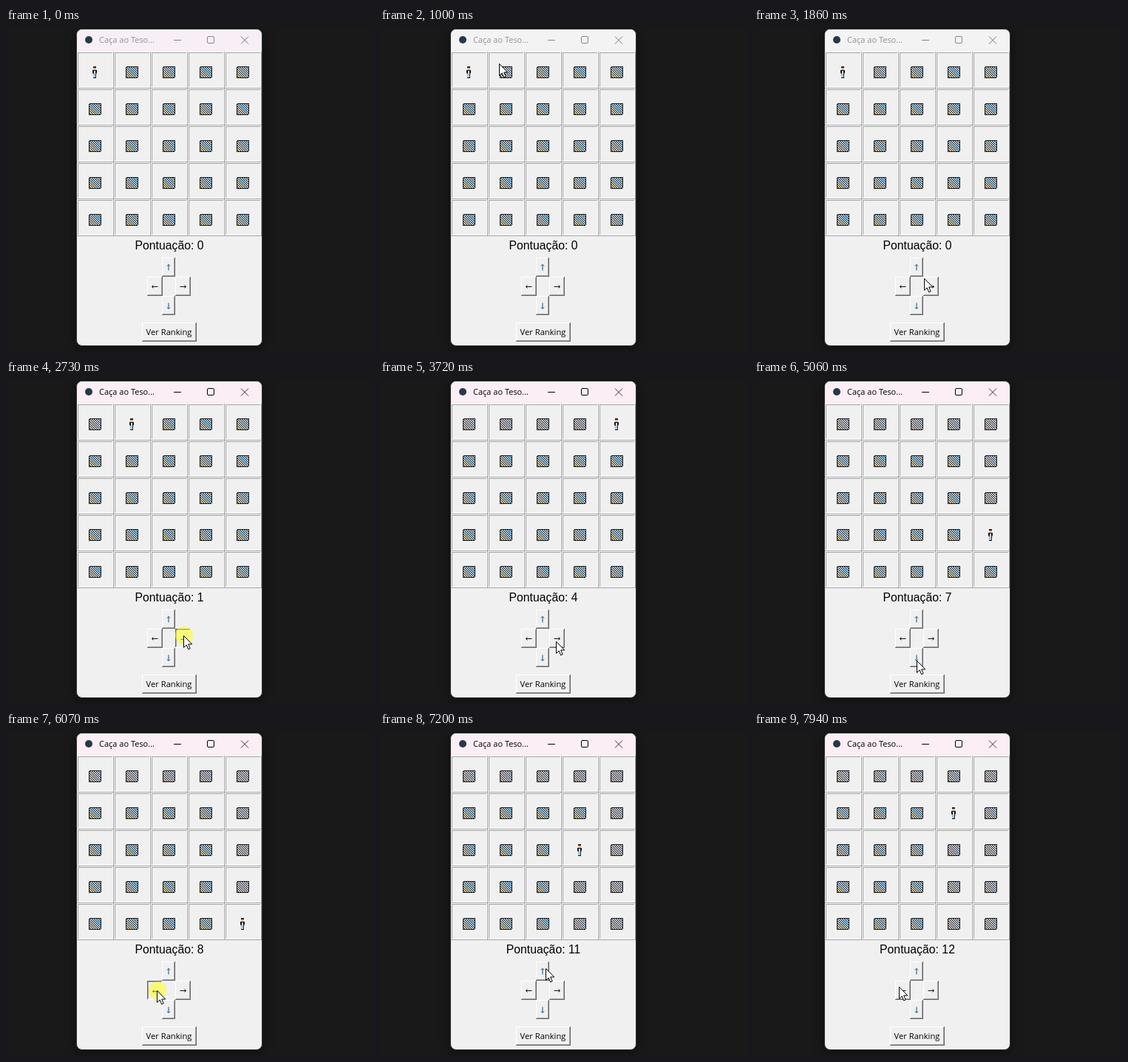
Recreate the animation shown at these times as an HTML page. Size 498 by 439 pixels, loop 8000 ms.

```html
<!DOCTYPE html>
<html lang="pt">
<head>
<meta charset="utf-8">
<title>Caça ao Tesouro</title>
<style>
html, body { margin: 0; width: 100%; height: 100%; overflow: hidden; background: #191919; }
svg { display: block; width: 498px; height: 439px; }
.ui { font: 11.2px "Open Sans", "Noto Sans", sans-serif; }
#title { font-size: 11px; }
.score { font: 15.8px "Liberation Sans", Arial, sans-serif; text-anchor: middle; }
.crisp { shape-rendering: crispEdges; }
#window { filter: drop-shadow(0 3px 8px rgba(0, 0, 0, .45)); }
</style>
</head>
<body>
<svg id="stage" viewBox="0 0 498 439">
  <defs>
    <clipPath id="frame"><rect x="96" y="2" width="250" height="428" rx="7"/></clipPath>
    <pattern id="hatch" width="3" height="3" patternUnits="userSpaceOnUse"></pattern>
    <linearGradient id="fresh" x1="0" y1="1" x2="1" y2="0">
      <stop offset=".1" stop-color="#e8a840"/><stop offset=".6" stop-color="#62b0e4"/>
    </linearGradient>
    <linearGradient id="seen" x1="0" y1="1" x2="1" y2="0">
      <stop offset=".1" stop-color="#c99a7c"/><stop offset=".6" stop-color="#9cabc8"/>
    </linearGradient>
  </defs>
  <rect width="498" height="439" fill="#191919"/>
  <g id="window">
    <rect x="95.5" y="1.5" width="251" height="429" rx="7.5" fill="#f0f0f0" stroke="#3a3a3a"/>
    <g clip-path="url(#frame)"><rect id="bar" x="96" y="2" width="250" height="30"/></g>
    <circle cx="112" cy="16" r="5" fill="#26394a"/>
    <text id="title" class="ui" x="126" y="20">Caça ao Teso...</text>
    <g id="controls" fill="none">
      <path d="M227 16.5h10"/>
      <rect x="272.5" y="11.5" width="9" height="9" rx="1.5"/>
    </g>
    <path id="close" d="M318 11.5l10 10m0-10l-10 10" fill="none"/>
  </g>
  <g id="grid" class="crisp"></g>
  <g id="player" class="crisp"></g>
  <text id="score" class="score" x="221" y="300"></text>
  <g id="buttons"></g>
  <circle id="ring" r="12" fill="#ff0" opacity=".5"/>
  <path id="cursor" d="M-.5 .5V16.5L3.2 13 5.7 18.9 8.2 17.8 5.7 12H10.8Z" fill="#fff" stroke="#000"/>
</svg>
<script>
const LOOP = 8000, CELL = 50, LEFT = 96, TOP = 32;
const $ = id => document.getElementById(id);

function add(parent, tag, attrs) {
  const el = document.createElementNS("http://www.w3.org/2000/svg", tag);
  for (const key in attrs) el.setAttribute(key, attrs[key]);
  return parent.appendChild(el);
}
const box = (parent, x, y, width, height, fill) =>
  add(parent, "rect", { x, y, width, height, fill });
const line = (parent, d, stroke, width = 1) =>
  add(parent, "path", { d, stroke, fill: "none", "stroke-width": width });

// Two-pixel bevel: top-left corner lines, then bottom-right ones
function bevel(parent, x, y, w, h, [outerTL, innerTL, outerBR, innerBR]) {
  const ring = (i, tl, br) => {
    const x0 = x + i + .5, y0 = y + i + .5, x1 = x + w - i - .5, y1 = y + h - i - .5;
    line(parent, `M${x0} ${y1}V${y0}H${x1}`, tl);
    line(parent, `M${x0 - .5} ${y1}H${x1}V${y0 - .5}`, br);
  };
  ring(0, outerTL, outerBR);
  ring(1, innerTL, innerBR);
}
const RIDGE = ["#fff", "#a0a0a0", "#a0a0a0", "#fff"];
const RAISED = ["#fff", "#f0f0f0", "#696969", "#a0a0a0"];
const SUNKEN = ["#696969", "#a0a0a0", "#fff", "#f0f0f0"];

// Dark and light diagonals; the third one lets the tile's tint through
for (let y = 0; y < 3; y++) {
  box($("hatch"), y, y, 1, 1, "#23282c");
  box($("hatch"), (y + 2) % 3, y, 1, 1, "#ecebe8");
}

const tiles = [];
for (let row = 0; row < 5; row++) {
  for (let col = 0; col < 5; col++) {
    const x = LEFT + col * CELL, y = TOP + row * CELL;
    bevel($("grid"), x, y, CELL, CELL, RIDGE);
    const tile = add($("grid"), "g", { transform: `translate(${x + 16} ${y + 20})` });
    const shape = { x: .5, y: .5, width: 16, height: 15, rx: 1.5 };
    const tint = add(tile, "rect", shape);
    add(tile, "rect", { ...shape, fill: "url(#hatch)", stroke: "#161616" });
    tiles.push({ tile, tint });
  }
}

// Standing figure, centred on its own origin
const body = [
  [-2, -8, 4, 2, "#221d1b"], [-2, -6, 4, 3, "#e2c09c"], [-3, -3, 6, 5, "#15181c"],
  [-1, -2, 2, 4, "#d8e8f2"], [-3, 1, 1, 2, "#d9b590"], [2, 1, 1, 2, "#d9b590"],
  [-2, 2, 4, 5, "#9fc8e2"], [1, 2, 1, 5, "#2b3944"], [-2, 7, 4, 1, "#111"]
];
body.forEach(part => box($("player"), ...part));

function makeButton(x, y, w, h, drawLabel) {
  const group = add($("buttons"), "g", {});
  box(group, x, y, w, h, "#f0f0f0");
  const [up, down] = [RAISED, SUNKEN].map(style => {
    const g = add(group, "g", { class: "crisp" });
    bevel(g, x, y, w, h, style);
    return g;
  });
  const label = add(group, "g", {});
  drawLabel(label, x + w / 2, y + h / 2);
  return pressed => {
    up.style.display = pressed ? "none" : "";
    down.style.display = pressed ? "" : "none";
    label.setAttribute("transform", pressed ? "translate(1 1)" : "");
  };
}
const arrow = (angle, color) => (label, x, y) => {
  const g = add(label, "g", { transform: `translate(${x} ${y + .5}) rotate(${angle})` });
  line(g, "M-4 0H4M2 -2L4 0L2 2", color);
};
const buttons = {
  up: makeButton(211, 311, 18, 26, arrow(-90, "#17506e")),
  left: makeButton(191, 337, 21, 26, arrow(180, "#111")),
  right: makeButton(229, 337, 21, 26, arrow(0, "#111")),
  down: makeButton(211, 363, 18, 26, arrow(90, "#17506e"))
};
makeButton(184, 399, 74, 26, (label, x, y) => {
  add(label, "text", { class: "ui", x: x - .5, y: y + 4, "text-anchor": "middle", fill: "#000" })
    .textContent = "Ver Ranking";
})(false);

const STEP = { up: [0, -1], down: [0, 1], left: [-1, 0], right: [1, 0] };
// Button, press time, release time
const clicks = [
  ["right", 2200, 2400], ["right", 2660, 2790], ["right", 3050, 3120], ["right", 3250, 3320],
  ["down", 4250, 4300], ["down", 4580, 4720], ["down", 4930, 5060], ["down", 5330, 5400],
  ["left", 6070, 6190],
  ["up", 6870, 7000], ["up", 7130, 7200], ["up", 7270, 7340]
];
// Time, x, y of the pointer tip
const path = [
  [320, 403, 389], [460, 345, 290], [600, 235, 130], [800, 162, 48], [1000, 162, 48],
  [1130, 149, 62], [1330, 172, 150], [1560, 232, 285], [1700, 246, 326], [1790, 236, 333],
  [1860, 231, 339], [2130, 241, 346], [3660, 241, 346], [3720, 239, 354], [3900, 229, 384],
  [4100, 221, 380], [5470, 221, 380], [5740, 212, 362], [6000, 205, 350], [6330, 205, 350],
  [6600, 216, 334], [6870, 225, 320], [7340, 225, 320], [7540, 211, 334], [7680, 204, 342],
  [7930, 204, 342], [7940, 197, 345]
];

function pointerAt(t) {
  const i = path.findIndex(p => p[0] > t);
  if (i < 0) return path[path.length - 1].slice(1);
  const [t0, x0, y0] = path[i - 1], [t1, x1, y1] = path[i];
  const k = (t - t0) / (t1 - t0);
  return [Math.round(x0 + (x1 - x0) * k), Math.round(y0 + (y1 - y0) * k)];
}

function setStroke(el, color) {
  el.setAttribute("stroke", color);
}

function render(t) {
  let col = 0, row = 0, score = 0, held = null;
  const seen = new Set(t >= 800 ? [0, 1] : [0]);
  for (const [name, press, release] of clicks) {
    if (t >= release) {
      col += STEP[name][0];
      row += STEP[name][1];
      score++;
      seen.add(row * 5 + col);
    } else if (t >= press) held = name;
  }
  const here = row * 5 + col;
  tiles.forEach(({ tile, tint }, i) => {
    tile.style.display = i === here ? "none" : "";
    tint.setAttribute("fill", seen.has(i) ? "url(#seen)" : "url(#fresh)");
  });
  $("player").setAttribute("transform",
    `translate(${LEFT + col * CELL + 24} ${TOP + row * CELL + 28})`);
  $("score").textContent = "Pontuação: " + score;
  for (const name in buttons) buttons[name](name === held);

  const active = t >= clicks[0][1];
  $("bar").setAttribute("fill",
    active ? "#fbeef5" : t < 70 ? "#f7eff5" : t < 120 ? "#f5f1f4" : "#f3f3f3");
  $("title").setAttribute("fill", active ? "#000" : "#929292");
  setStroke($("controls"), active ? "#000" : "#858585");
  setStroke($("close"), active ? "#333" : "#777");

  const shown = t >= path[0][0];
  $("cursor").style.display = shown ? "" : "none";
  $("ring").style.display = held ? "" : "none";
  if (shown) {
    const at = `translate(${pointerAt(t).join(" ")})`;
    $("cursor").setAttribute("transform", at);
    $("ring").setAttribute("transform", at);
  }
}

let start = null;
function tick(now) {
  if (start === null) start = now;
  render((now - start) % LOOP);
  requestAnimationFrame(tick);
}
render(0);
requestAnimationFrame(tick);
</script>
</body>
</html>
```
